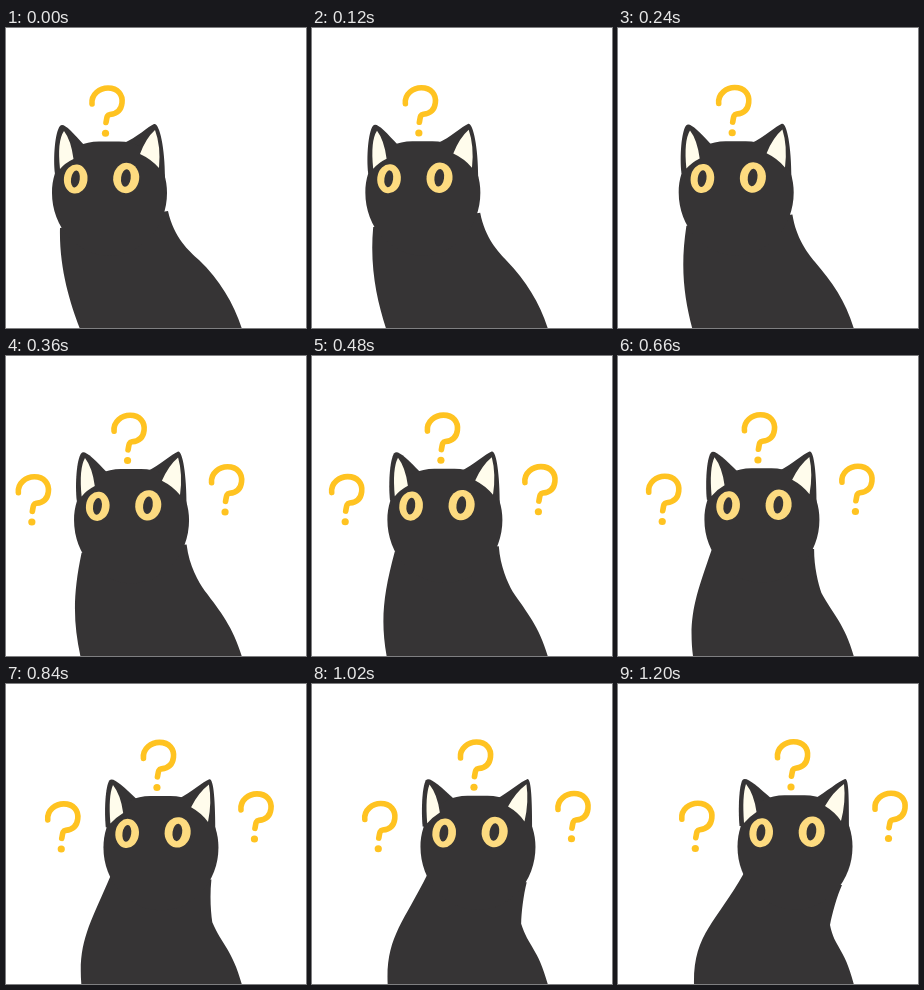
These frames come from a looping animation (300x300 px, 2200 ms). An HTML page with a canvas:

```html
<!DOCTYPE html>
<html lang="en">
<head>
<meta charset="utf-8">
<style>
html, body { margin: 0; width: 100%; height: 100%; overflow: hidden; background: #fff; }
canvas { display: block; width: 100vw; height: 100vh; }
</style>
</head>
<body>
<canvas id="stage"></canvas>
<script>
const LOOP = 2200, STEP = 60, STEPS = 20, SIDE_STEP = 6;
const SHIFT = { x: 73.5, y: -2.3 };
const FUR = '#363435', GOLD = '#fddb80', CREAM = '#fffcec', MARK = '#ffc321';

// Each part is drawn between a left pose and a right pose.
const body = [
  'M74 301 C64 275 53 240 54 200 L162 183 C168 210 183 223 193 232 C214 252 228 276 236 301 Z',
  'M76 301 C75 250 98 239 126 189 L224 201 C219 212 214 230 212 241 C217 265 226 262 236 301 Z'
];
const ears = [
  ['M49 146 C47 130 49 104 54 98 C57 94 64 101 80 119 L75 150 Z',
   'M121.5 142 C120 125 121 102 124.5 96 C128 92 137 100 155 116 L150 147 Z'],
  ['M118 115 C130 110 143 98 148 96 C153 94 159 118 159 150 L130 150 Z',
   'M196 115 C208 108 221 97 227 95 C231 94 231 115 231 150 L204 148 Z']
];
const linings = [
  ['M54 141 Q51 113 58 103 Q65 112 67.5 131 Q59 135 54 141 Z',
   'M126 139 Q124 112 128 100 Q136 110 138.5 128 Q131 133 126 139 Z'],
  ['M134 126 Q140 110 149 102 Q155 118 153 140 Q145 131 134 126 Z',
   'M207 122 Q215 108 226 100 Q228 118 223 137 Q217 128 207 122 Z']
];
const skull = new Path2D('M46 165 C46 138 62 114 93 113.6 L113 113.6 C145 114 161 138 161 165 A57.5 63 0 0 1 46 165 Z');
const hook = new Path2D('M86 76 C85 66 94 60 102 60 C112 60 117 67 116 75 C115 84 109 86 104 86.5 C100.5 87 101 90 100 94.5');

const canvas = document.getElementById('stage');
const ctx = canvas.getContext('2d');

function mix([a, b], u) {
  const ends = b.match(/[\d.]+/g);
  let i = 0;
  return new Path2D(a.replace(/[\d.]+/g, n => +n + (ends[i++] - n) * u));
}

function fill(path, color) {
  ctx.fillStyle = color;
  ctx.fill(path);
}

function oval(x, y, rx, ry, color, tilt = 0) {
  ctx.fillStyle = color;
  ctx.beginPath();
  ctx.ellipse(x, y, rx, ry, tilt, 0, Math.PI * 2);
  ctx.fill();
}

function eye(x, y, rx, ry) {
  oval(x, y, rx, ry, GOLD, 0.12);
  oval(x - 0.3, y, rx * 0.37, ry * 0.58, FUR, 0.14);
}

function question(dx, dy) {
  ctx.save();
  ctx.translate(dx, dy);
  ctx.strokeStyle = MARK;
  ctx.lineWidth = 5.6;
  ctx.lineCap = ctx.lineJoin = 'round';
  ctx.stroke(hook);
  oval(99.5, 105.2, 3.6, 3.5, MARK);
  ctx.restore();
}

function draw(step) {
  const u = step / STEPS;
  ctx.fillStyle = '#fff';
  ctx.fillRect(0, 0, 300, 300);

  fill(mix(body, u), FUR);
  ears.forEach(e => fill(mix(e, u), FUR));

  ctx.save();
  ctx.translate(SHIFT.x * u, SHIFT.y * u);
  fill(skull, FUR);
  eye(69.7, 151, 11.8, 14.6);
  eye(120.2, 150, 13, 15.2);
  question(0, 0);
  if (step >= SIDE_STEP) {
    question(-95.7, 61.5);
    question(97.5, 51.5);
  }
  ctx.restore();

  linings.forEach(l => fill(mix(l, u), CREAM));
}

function resize() {
  const ratio = window.devicePixelRatio || 1;
  canvas.width = Math.round(innerWidth * ratio);
  canvas.height = Math.round(innerHeight * ratio);
  ctx.setTransform(canvas.width / 300, 0, 0, canvas.height / 300, 0, 0);
}

const start = performance.now();
function tick() {
  const t = (performance.now() - start) % LOOP;
  draw(Math.min(Math.floor(t / STEP), STEPS));
  requestAnimationFrame(tick);
}

addEventListener('resize', resize);
resize();
tick();
</script>
</body>
</html>
```
